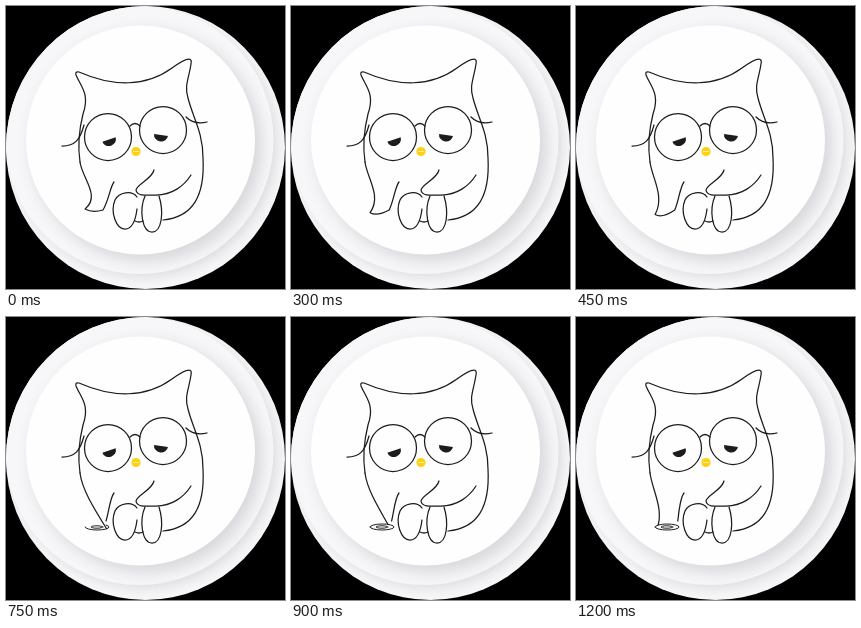
An HTML page with a canvas that plays this animation: 279x283 px, repeating every 1350 ms.

```html
<!DOCTYPE html>
<html lang="en">
<head>
<meta charset="utf-8">
<title>Bored owl</title>
<style>
html, body { margin: 0; width: 100%; height: 100%; overflow: hidden; background: #000; }
canvas { display: block; width: 279px; height: 283px; }
</style>
</head>
<body>
<canvas id="stage" width="279" height="283"></canvas>
<script>
const ctx = document.getElementById('stage').getContext('2d');
const STEP = 150, STEPS = 9, TAU = Math.PI * 2;
const INK = '#1c1c1c';
const puddle = { x: 91, y: 210, rx: 12, ry: 3 };

const lines = [
  // head and back
  `M74 156 C71 136 74 120 77 108 C84 88 75 81 70 69 Q69 65 73 66
   C107 81 140 81 166 62 Q178 53 183 53 Q186 53 185 58
   C183 72 178 80 182 92 C187 112 197 126 197 152 C199 190 187 211 157 214`,
  // resting wing
  'M148 164 C146 173 131 178 130 184 C131 191 142 189 150 189 C166 189 178 180 185 169',
  // feet
  'M131 191 C126 184 113 186 109 194 C104 206 110 223 119 223 C128 223 130 211 131 203',
  'M139 190 C133 204 136 226 146 226 C156 226 158 206 153 190',
  'M129 215 Q133 217 137 215',
  // bridge and temples
  'M124 120 Q129 115 134 120',
  'M56 140 C69 140 74 134 78 119',
  'M180 111 Q188 119 201 116'
].map(d => new Path2D(d));

const mix = (a, b, k) => a + (b - a) * k;
const clamp = k => Math.min(1, Math.max(0, k));
const easeOut = k => 1 - (1 - k) ** 2;

function oval(x, y, rx, ry = rx, from = 0, to = TAU, tilt = 0) {
  ctx.beginPath();
  ctx.ellipse(x, y, rx, ry, tilt, from, to);
}

function disc(x, y, r, color, blur, shift, shade) {
  ctx.save();
  ctx.shadowColor = `rgba(60,60,75,${shade})`;
  ctx.shadowBlur = blur;
  ctx.shadowOffsetX = ctx.shadowOffsetY = shift;
  ctx.fillStyle = color;
  oval(x, y, r);
  ctx.fill();
  ctx.restore();
}

function backdrop() {
  ctx.fillStyle = '#000';
  ctx.fillRect(0, 0, 279, 283);
  ctx.save();
  oval(139.5, 141.5, 139.5, 141.5);
  ctx.clip();
  ctx.fillStyle = '#f7f7f9';
  ctx.fillRect(0, 0, 279, 283);
  disc(133.5, 134, 134, '#f7f7f9', 12, 4, .12);
  disc(134.5, 134, 114.5, '#fefefe', 16, 6, .18);
  ctx.restore();
}

function eye(x, y, tilt) {
  ctx.fillStyle = INK;
  oval(x, y, 7, 6.5, 0, Math.PI, tilt);
  ctx.fill();
}

function beak() {
  ctx.fillStyle = '#ffd012';
  oval(130, 145.5, 4.6);
  ctx.fill();
  ctx.fillStyle = '#fff0a8';
  ctx.fillRect(127, 145, 6, 1);
}

// The wing reaches down, then its tip sweeps round the puddle.
function wing(step) {
  const reach = clamp(step / 4), sweep = easeOut(clamp((step - 4) / 4));
  const angle = 3 - 5.4 * sweep;
  const tip = {
    x: puddle.x + puddle.rx * Math.cos(angle),
    y: mix(203, puddle.y + puddle.ry * Math.sin(angle), reach)
  };
  const inner = { x: 97 + step * .6, y: 204 };

  ctx.beginPath();
  ctx.moveTo(74, 156);
  ctx.bezierCurveTo(76, 172, mix(95, 87, reach), 190, tip.x, tip.y);
  if (!sweep) ctx.quadraticCurveTo(tip.x + 7, tip.y + 4, inner.x, inner.y);
  ctx.moveTo(inner.x, inner.y);
  ctx.bezierCurveTo(103, 194, 104, 181, 108, 176);
  ctx.stroke();

  if (!sweep) return;
  ctx.lineWidth = 1;
  ctx.beginPath();
  ctx.ellipse(puddle.x, puddle.y, puddle.rx, puddle.ry, 0, Math.PI, Math.PI - TAU * clamp(sweep * 1.4), true);
  ctx.stroke();
  oval(puddle.x, puddle.y, 6, 1.2);
  ctx.stroke();
}

function draw(step) {
  backdrop();
  ctx.lineCap = ctx.lineJoin = 'round';
  ctx.strokeStyle = INK;
  ctx.lineWidth = 1.25;
  lines.forEach(p => ctx.stroke(p));
  for (const [x, y] of [[102, 131], [157, 124]]) {
    oval(x, y, 23.5);
    ctx.stroke();
  }
  eye(103, 133.5, -.32);
  eye(155, 129, .14);
  beak();
  wing(step);
}

function tick() {
  draw(Math.floor(performance.now() / STEP) % STEPS);
  requestAnimationFrame(tick);
}
tick();
</script>
</body>
</html>
```
